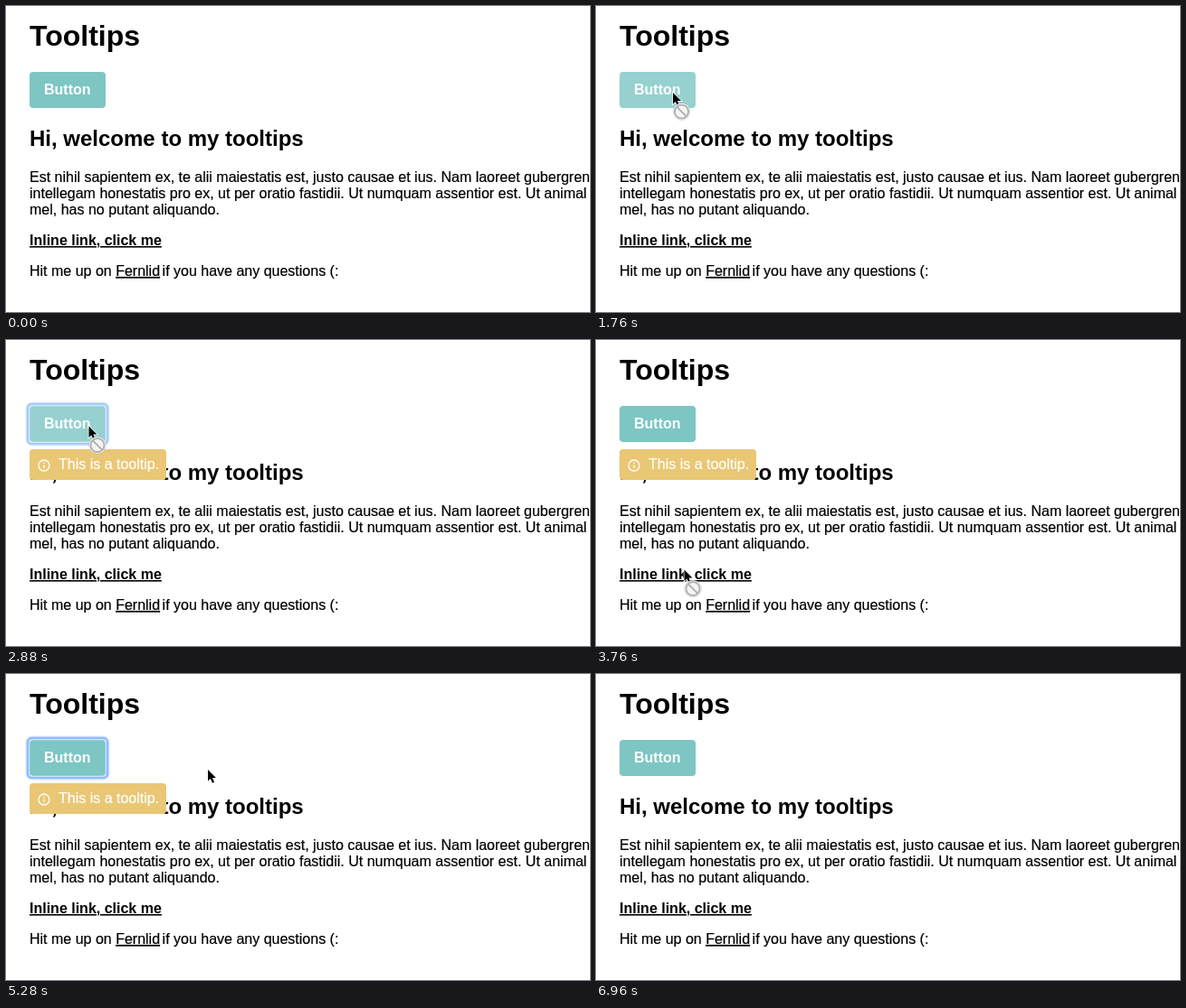
An HTML page that plays this animation: 645x339 px, repeating every 7.76 s.

```html
<!DOCTYPE html>
<html lang="en">
<head>
<meta charset="utf-8">
<title>Tooltips</title>
<style>
  html, body { margin: 0; width: 100%; height: 100%; overflow: hidden; background: #fff; }
  svg { display: block; }
  text {
    font: 16px "Liberation Sans", Arial, Helvetica, sans-serif;
    fill: currentColor; stroke: currentColor; stroke-width: .2px;
  }
  .bold { font-weight: bold; stroke: none; }
  .h1 { font-size: 32px; }
  .h2 { font-size: 24px; }
  .link { text-decoration: underline 1px; }
  .light { color: #fff; }
</style>
</head>
<body>
<svg width="645" height="339" viewBox="0 0 645 339">
  <rect width="645" height="339" fill="#fff"/>
  <text class="bold h1" x="26" y="44">Tooltips</text>
  <text class="bold h2" x="26" y="155">Hi, welcome to my tooltips</text>
  <text x="26" y="195">Est nihil sapientem ex, te alii maiestatis est, justo causae et ius. Nam laoreet gubergren</text>
  <text x="26" y="213">intellegam honestatis pro ex, ut per oratio fastidii. Ut numquam assentior est. Ut animal</text>
  <text x="26" y="231">mel, has no putant aliquando.</text>
  <text class="bold link" x="26" y="265">Inline link, click me</text>
  <text x="26" y="299">Hit me up on <tspan class="link">Fernlid</tspan></text>
  <text x="172.6" y="299">if you have any questions (:</text>

  <g id="button">
    <rect x="26" y="73" width="84" height="40" rx="4" fill="#7dc6c4"/>
    <g id="ring" fill="none" stroke="#82b7f8">
      <rect x="24" y="71" width="88" height="44" rx="4.5" stroke-opacity=".3" stroke-width="5"/>
      <rect x="24" y="71" width="88" height="44" rx="4.5" stroke-opacity=".85" stroke-width="2.6"/>
      <rect x="26" y="73" width="84" height="40" rx="3.5" stroke="#fff" stroke-opacity=".35"/>
    </g>
    <text class="bold light" x="42" y="98">Button</text>
  </g>

  <g id="tip" class="light">
    <rect x="26" width="151" height="34" rx="4" fill="#e9c774"/>
    <g fill="none" stroke="#fff" stroke-width="1.3">
      <circle cx="42" cy="18" r="6"/>
      <path d="M42 17.3v4M42 14.6v1.4"/>
    </g>
    <text x="58" y="22">This is a tooltip.</text>
  </g>

  <g id="cursor">
    <path transform="scale(.9)" d="M0 0V14L3.2 11L5.5 16.3L7.8 15.3L5.5 10.1H10Z" stroke="#fff" stroke-width="1.6" paint-order="stroke"/>
    <g id="denied" transform="translate(9.5 21)" fill="none" stroke="#b0b0b0" stroke-width="2">
      <circle r="9.5" fill="#fff" stroke="#000" stroke-opacity=".12" stroke-width="1"/>
      <circle r="7.6" fill="#f4f4f4"/>
      <path d="M-5.4 -5.4L5.4 5.4"/>
    </g>
  </g>
</svg>
<script>
  const LOOP = 7760, STEP = 80;
  const ENTER = 320, WAKE = 1760, EXIT = 6960;
  const ENTRY = { x: 347, y: 316 };
  const [button, ring, tip, cursor, denied] =
    ["button", "ring", "tip", "cursor", "denied"].map(id => document.getElementById(id));

  const areas = {
    button: { left: 26, top: 73, right: 110, bottom: 113, tipY: 121 },
    link: { left: 26, top: 250, right: 172, bottom: 268, tipY: 293 }
  };

  const glide = (leave, arrive, x, y) => ({ leave, arrive, x, y });
  const glides = [
    glide(ENTER, 1040, 87.5, 97.5),
    glide(1680, WAKE, 85, 96),
    glide(2400, 2640, 80.5, 90.5),
    glide(2640, 2880, 91.5, 95.5),
    glide(3040, 3680, 97.5, 254.5),
    glide(4320, 4800, 87.5, 86),
    glide(4960, 5280, 223, 106),
    glide(5440, 5920, 82.5, 105),
    glide(6160, 6400, 219, 103),
    glide(6800, 6880, 234, 160)
  ];

  const ease = u => u * u * (3 - 2 * u);
  const show = (el, on) => el.setAttribute("visibility", on ? "visible" : "hidden");

  function pointerAt(t) {
    let { x, y } = ENTRY;
    for (const g of glides) {
      if (t <= g.leave) break;
      const u = ease(Math.min(1, (t - g.leave) / (g.arrive - g.leave)));
      x += (g.x - x) * u;
      y += (g.y - y) * u;
    }
    return { x, y };
  }

  function areaAt({ x, y }) {
    return Object.values(areas).find(a => x >= a.left && x < a.right && y >= a.top && y < a.bottom);
  }

  // What each click lands on decides the focus ring and the tooltip.
  const clicks = [2160, 3760, 4800, 5360, 5920, 6720]
    .map(time => ({ time, area: areaAt(pointerAt(time)) }));
  const clickedAt = t => clicks.filter(c => c.time <= t).pop()?.area;

  function render(ms) {
    const t = Math.floor((ms % LOOP) / STEP) * STEP;
    const p = pointerAt(t);
    const visible = t >= ENTER && t < EXIT;
    const over = visible && t >= WAKE ? areaAt(p) : undefined;
    const focused = clickedAt(t);
    // Tooltips open one step late but close at once.
    const tipArea = focused && clickedAt(t - STEP);

    button.setAttribute("opacity", over === areas.button ? 0.8 : 1);
    show(ring, focused === areas.button);
    show(tip, tipArea);
    if (tipArea) tip.setAttribute("transform", `translate(0 ${tipArea.tipY})`);
    cursor.setAttribute("transform", `translate(${p.x} ${p.y})`);
    show(cursor, visible);
    show(denied, over);
  }

  const start = performance.now();
  function tick() {
    render(performance.now() - start);
    requestAnimationFrame(tick);
  }
  tick();
</script>
</body>
</html>
```
